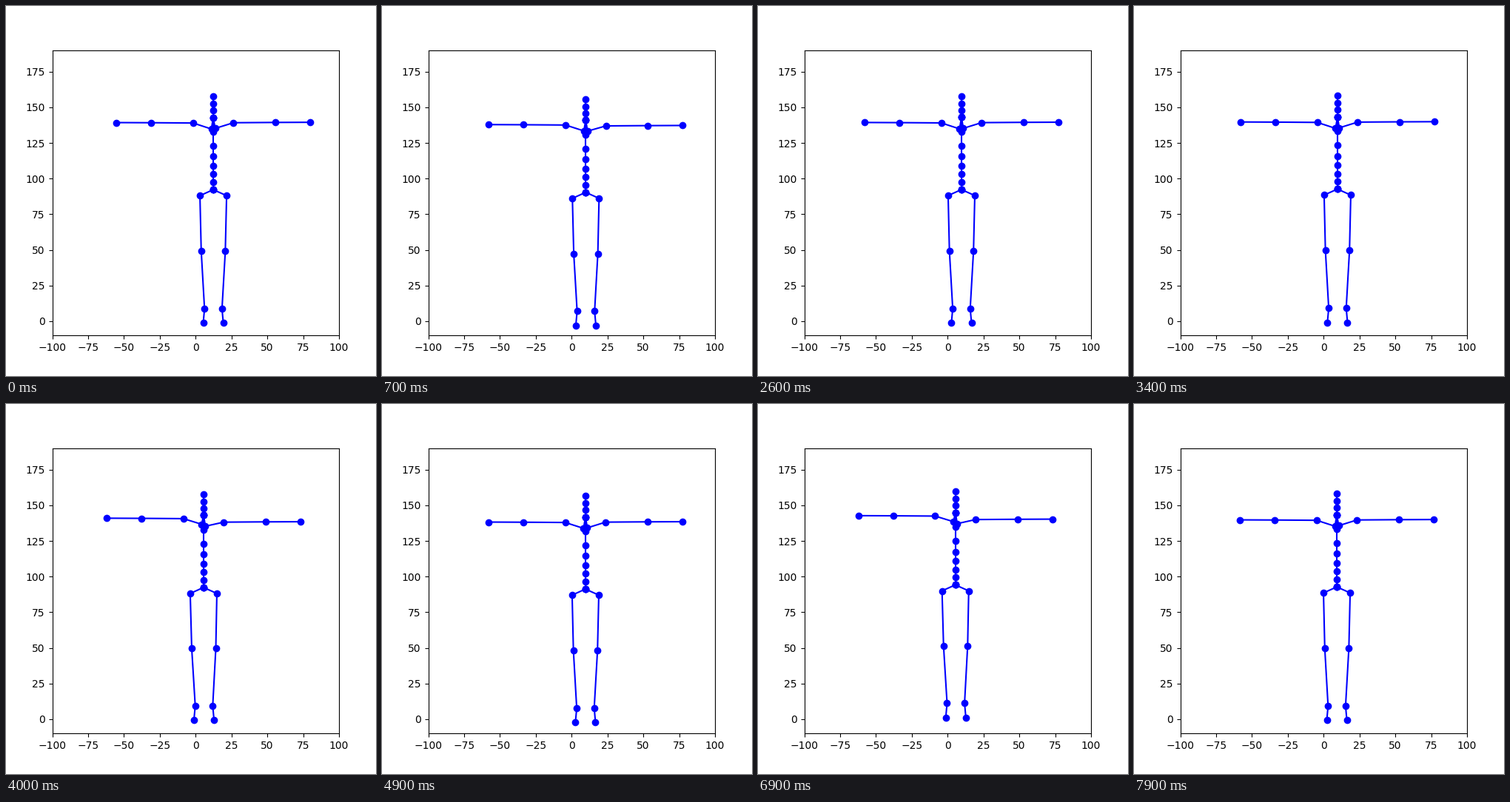
A matplotlib script for the animation above (8 s loop, 500 by 500 pixels).

```python
import numpy as np
import matplotlib.pyplot as plt
from matplotlib.animation import FuncAnimation

FRAMES, STEP = 80, 100

# Sideways lurches: (time in s, sway depth, bob depth).
LURCHES = [(1.05, 10.3, 3.7), (4.15, 5.4, 1.0), (7.05, 5.4, 2.2)]

# Resting pelvis position: (time in s, value).
REST_X = [(0, 12.3), (1.75, 12.1), (2.6, 9.65), (6.4, 9.65), (7.9, 9.2)]
REST_Y = [(0, 92.3), (2.6, 92.3), (3.1, 93.3), (5.2, 91.2), (6.2, 91.2),
          (6.9, 94.4), (7.9, 92.8)]

# Body shape relative to the pelvis; limbs are mirrored.
SPINE = [0, 5.2, 10.8, 16.7, 23.3, 30.7, 40.5, 50.7, 55.6, 60.4, 65.5]
NECK = (0, SPINE[7])
ARM = [(1.3, 42.9), (14.1, 47.0), (43.4, 47.2), (67.6, 47.3)]
LEG = [(9.3, -4.2), (8.4, -43.1), (6.1, -83.6), (7.0, -93.6)]


def pulse(t, center, width):
    return np.exp(-((t - center) / width) ** 2)


def ease(keys, t):
    """Smoothstep between key points."""
    k, v = np.array(keys).T
    i = min(np.searchsorted(k, t, "right"), len(k) - 1) - 1
    u = (t - k[i]) / (k[i + 1] - k[i])
    return v[i] + (v[i + 1] - v[i]) * u * u * (3 - 2 * u)


def arm(side, collar, lift):
    (x0, y0), *rest = ARM
    return [NECK, (side * x0, y0 + collar)] + [(side * x, y + lift) for x, y in rest]


def leg(side, lurch):
    """The foot trails the pelvis and lifts a little during a lurch."""
    reach = [0, 0.5, 1, 1]
    return [(0, 0)] + [(side * x + 0.4 * lurch * r, y + 0.7 * lurch * r)
                       for (x, y), r in zip(LEG, reach)]


def pose(t):
    lurch = sway = before = after = 0
    for c, depth, bob in LURCHES:
        p = pulse(t, c, 0.29)
        lurch += p
        sway += depth * p
        before += bob * pulse(t, c - 0.55, 0.25)
        after += bob * pulse(t, c + 0.35, 0.25)
    root = ease(REST_X, t) - sway, ease(REST_Y, t) - before - after
    chains = [
        [(0, y) for y in SPINE],
        arm(-1, 2.3 * lurch + 0.27 * after - 0.3, 2 * lurch - 0.67 * after - 0.2),
        arm(1, 0.1, 0.13 * after - 1.5 * lurch),
        leg(-1, lurch),
        leg(1, lurch),
    ]
    return [np.add(chain, root) for chain in chains]


fig, ax = plt.subplots(figsize=(5, 5), dpi=100)
ax.set_xlim(-100, 100)
ax.set_ylim(-10, 190)
bones = [ax.plot([], [], "o-", color="blue", lw=1.5, ms=6)[0] for _ in range(5)]


def draw(i):
    for bone, points in zip(bones, pose(i * STEP / 1000)):
        bone.set_data(*points.T)
    return bones


anim = FuncAnimation(fig, draw, frames=FRAMES, interval=STEP,
                     repeat=True, repeat_delay=0)
plt.show()
```
